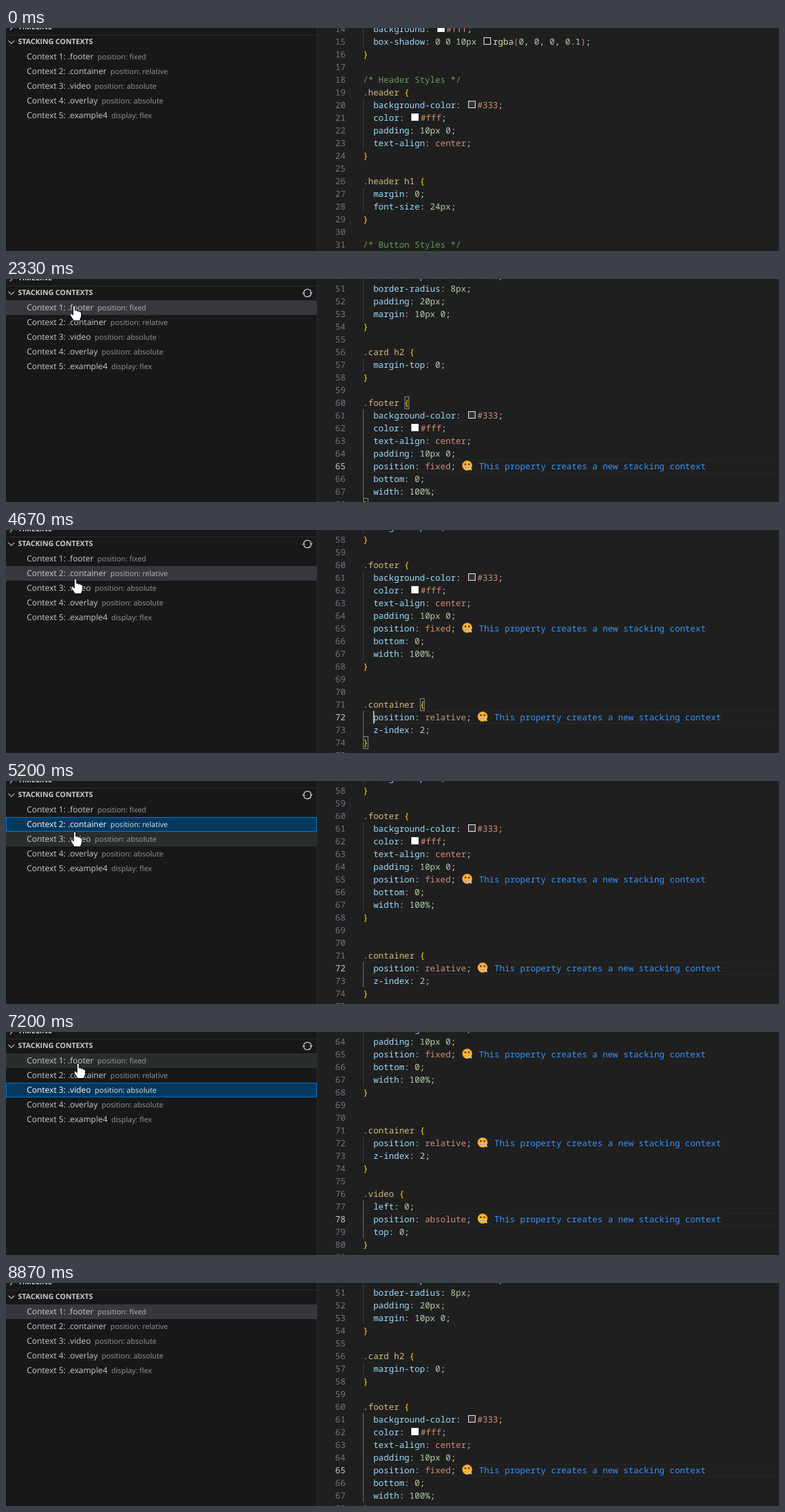
Recreate the animation shown at these times as an HTML page. Size 1154 by 334 pixels, loop 9 s.

```html
<!DOCTYPE html>
<html lang="en">
<head>
<meta charset="utf-8">
<title>Stacking contexts</title>
<style>
  html, body { margin: 0; width: 100%; height: 100%; overflow: hidden; background: #1f1f1f; }
  body { position: relative; color: #ccc; text-rendering: geometricPrecision; white-space: pre; }

  #sidebar { position: absolute; left: 0; top: 0; width: 464px; height: 100%; background: #181818;
    border-right: 1px solid #2b2b2b; overflow: hidden; font: 12.3px/22px "Open Sans", sans-serif; }
  .title { position: absolute; left: 18px; font-size: 10.83px; font-weight: bold; }
  .row { position: absolute; left: 0; width: 433px; height: 22px; padding-left: 31px; }
  .row small { margin-left: 5.8px; font-size: 11.1px; opacity: .7; }
  .row.hover { background: #2a2d2e; }
  .row.selected { background: #37373d; }
  .row.selected small { opacity: .85; }
  .row.focused { background: #04395e; color: #fff; box-shadow: inset 0 0 0 1px #0078d4; }
  #icons { position: absolute; left: 0; top: 0; fill: none; stroke: #ccc; stroke-width: 1.1; }
  #tooltip { position: absolute; left: 111px; top: 53px; height: 22px; padding: 0 8px; font-size: 11.8px;
    background: #202020; border: 1px solid #454545; border-radius: 3px; }

  #editor { position: absolute; left: 465px; right: 0; top: 0; height: 100%; overflow: hidden;
    font: 12.83px/19px "Noto Sans Mono", monospace; }
  .line { position: absolute; left: 68px; right: 0; height: 19px; }
  .number { position: absolute; right: calc(100% + 26px); color: #6e7681; }
  .indented::before { content: ""; position: absolute; left: 0; top: 0; width: 1px; height: 19px; background: #404040; }
  .inside::before { background: #707070; }
  .current { box-shadow: inset 0 1px #282828, inset 0 -1px #282828; }
  .current .number { color: #ccc; }
  .matched .brace { background: rgba(0, 100, 0, .1); box-shadow: inset 0 0 0 1px #888; }
  .brace { display: inline-block; height: 19px; color: #ffd700; }
  .paren { color: #da70d6; }
  .comment { color: #6a9955; }
  .selector { color: #d7ba7d; }
  .property { color: #9cdcfe; }
  .value { color: #ce9178; }
  .num { color: #b5cea8; }
  .func { color: #dcdcaa; }
  .note { color: #3794ff; }
  .note svg { display: inline-block; width: 19px; height: 17px; vertical-align: -3px; }
  .swatch { display: inline-block; box-sizing: border-box; width: 11.2px; height: 11.2px; margin: 0 2.8px;
    border: 1px solid #eee; }
  #caret { position: absolute; left: 82.5px; top: 271px; width: 2px; height: 19px; background: #aeafad; }

  #pointer { position: absolute; left: 0; top: 0; overflow: visible; fill: #fff; stroke: #000; }
</style>
</head>
<body>
<div id="editor"><div id="code"></div><div id="caret"></div></div>
<div id="sidebar">
  <div class="title" style="top:-12px">TIMELINE</div>
  <div class="title" style="top:10px">STACKING CONTEXTS</div>
  <svg id="icons" width="464" height="34">
    <path d="M0 10.5H464" stroke="#2b2b2b"/>
    <path d="M6 -5L10 -1L6 3.3M3.5 18.8L8 23.3L12.5 18.8"/>
    <g id="refresh" stroke-width="1.4">
      <path d="M444.5 20A5.7 5.7 0 0 1 455.4 19M455.5 22A5.7 5.7 0 0 1 444.6 23"/>
      <path d="M453 19.8H458L455.6 22.6ZM442 22.2H447L444.4 19.4Z" fill="#ccc" stroke="none"/>
    </g>
  </svg>
</div>
<svg id="pointer" width="1" height="1">
  <path id="hand" d="M-2 1.6Q-2 0 -.4 0Q1.2 0 1.2 1.6V7Q3.6 6 4.6 8Q7 7 7.8 9Q10.5 8.5 10.5 11.2V16L8.2 22.5H-1L-6 14.8Q-7 11.5 -4.4 11.6L-2 14Z"/>
  <path id="arrow" d="M0 0V16L3.8 12.6L6.2 18.4L8.8 17.3L6.4 11.7H11.4Z"/>
</svg>
<script>
const LOOP = 9000, ROW_TOP = 32, ROW_HEIGHT = 22, LINE = 19, CURRENT_TOP = 271;
const $ = id => document.getElementById(id);

const contexts = [
  ['.footer', 'position: fixed'], ['.container', 'position: relative'], ['.video', 'position: absolute'],
  ['.overlay', 'position: absolute'], ['.example4', 'display: flex'],
];

// Only the parts of the style sheet that scroll into view, keyed by first line number.
const listing = {
  14: `  background: #fff;
  box-shadow: 0 0 10px rgba(0, 0, 0, 0.1);
}

/* Header Styles */
.header {
  background-color: #333;
  color: #fff;
  padding: 10px 0;
  text-align: center;
}

.header h1 {
  margin: 0;
  font-size: 24px;
}

/* Button Styles */`,
  50: `  border: 1px solid #ddd;
  border-radius: 8px;
  padding: 20px;
  margin: 10px 0;
}

.card h2 {
  margin-top: 0;
}

.footer {
  background-color: #333;
  color: #fff;
  text-align: center;
  padding: 10px 0;
  position: fixed;
  bottom: 0;
  width: 100%;
}


.container {
  position: relative;
  z-index: 2;
}

.video {
  left: 0;
  position: absolute;
  top: 0;
}
`,
};
const blocks = { 65: [60, 68], 72: [71, 74], 78: [76, 80] };

// [time, selected row, where the focus is, current line]
const START_LINE = 28 + 13 / LINE;
const states = [
  [0, -1, 'none', START_LINE], [1800, 0, 'list', START_LINE], [1870, 0, 'editor', 65],
  [3530, 0, 'list', 65], [3670, 1, 'list', 65], [3730, 1, 'editor', 72],
  [5130, 1, 'list', 72], [5400, 2, 'list', 72], [5470, 2, 'editor', 78],
  [7130, 2, 'list', 78], [7265, 0, 'list', 78], [7330, 0, 'editor', 65],
  [8800, 0, 'none', 65],
];

// [time, x, y] of the pointer's hot spot
const path = [
  [870, 150, 4], [1330, 102, 40], [2800, 102, 40], [3330, 103, 63], [4530, 103, 63], [4670, 104, 73],
  [4930, 103, 76], [6400, 103, 76], [6930, 108, 47], [8000, 108, 47], [8600, 130, 340],
];

const span = (cls, text) => `<span class="${cls}">${text}</span>`;
const swatch = color => `<span class="swatch" style="background:${color}"></span>`;
const note = ' ' + span('note', `<svg viewBox="0 0 19 17">
<circle cx="9.5" cy="8.5" r="7.4" fill="#ffb02e"/><circle cx="6.8" cy="6.5" r="1.3" fill="#402a32"/>
<circle cx="12.2" cy="6.5" r="1.3" fill="#402a32"/><path d="M5.5 11.5H13L16 15" fill="none" stroke="#d3d3d3" stroke-width="2.2"/>
<path d="M6 11.5H13" stroke="#636363" stroke-dasharray="1 1"/></svg> This property creates a new stacking context`);

function highlightValue(value) {
  return value.replace(/(#\w+)|(rgba)|([\d.]+[a-z%]*)|([a-z]+)|([()])/g, (m, hex, func, num, word, paren) =>
    hex ? swatch(hex) + span('value', hex) :
    func ? swatch('rgba(0,0,0,.1)') + span('func', func) :
    span(num ? 'num' : word ? 'value' : 'paren', m));
}

function highlight(text) {
  if (text.startsWith('/*')) return span('comment', text);
  if (text === '}') return span('brace', text);
  if (text.endsWith('{')) return span('selector', text.slice(0, -1)) + span('brace', '{');
  const [name, value] = text.split(':');
  if (!value) return text;
  return span('property', name) + ':' + highlightValue(value) + (name.trim() === 'position' ? note : '');
}

function add(parent, cls, html, top) {
  const el = document.createElement('div');
  el.className = cls;
  el.innerHTML = html;
  if (top !== undefined) el.style.top = top + 'px';
  return parent.appendChild(el);
}

const lines = Object.entries(listing).flatMap(([first, text]) => text.split('\n').map((content, i) => {
  const n = +first + i;
  const el = add($('code'), 'line' + (content.startsWith('  ') ? ' indented' : ''),
    span('number', n) + highlight(content), n * LINE);
  return { n, el };
}));
const rows = contexts.map(([name, rule], i) =>
  add($('sidebar'), 'row', `Context ${i + 1}: ${name}<small>${rule}</small>`, ROW_TOP + i * ROW_HEIGHT));
const tooltip = add($('sidebar'), '', 'Context 1: .footer position: fixed');
tooltip.id = 'tooltip';

function pointerAt(t) {
  if (t < path[0][0] || t >= path[path.length - 1][0]) return null;
  const i = path.findIndex(p => p[0] > t);
  const [t0, x0, y0] = path[i - 1], [t1, x1, y1] = path[i];
  const p = (t - t0) / (t1 - t0), e = p * p * (3 - 2 * p);
  return { x: x0 + (x1 - x0) * e, y: y0 + (y1 - y0) * e };
}

const show = (el, visible) => { el.style.visibility = visible ? 'visible' : 'hidden'; };

function render(t) {
  const [since, selected, focus, current] = states.filter(s => s[0] <= t).pop();
  const inEditor = focus === 'editor';
  const block = blocks[current] || [0, 0];
  const pointer = pointerAt(t);
  const hovered = pointer ? Math.floor((pointer.y - ROW_TOP) / ROW_HEIGHT) : -1;

  rows.forEach((el, i) => {
    el.classList.toggle('hover', i === hovered);
    el.classList.toggle('selected', i === selected);
    el.classList.toggle('focused', i === selected && focus === 'list');
  });
  $('code').style.transform = `translateY(${Math.round(CURRENT_TOP - current * LINE)}px)`;
  for (const { n, el } of lines) {
    el.classList.toggle('current', n === current);
    el.classList.toggle('inside', n > block[0] && n < block[1]);
    el.classList.toggle('matched', inEditor && block.includes(n));
  }
  show($('caret'), inEditor && (t - since + 35) % 970 < 485);

  show(tooltip, t >= 1530 && t < 1670);
  tooltip.style.opacity = t < 1595 ? .25 : 1;
  show($('refresh'), pointer);
  show($('pointer'), pointer);
  if (pointer) {
    const overList = pointer.y < ROW_TOP + rows.length * ROW_HEIGHT;
    $('pointer').style.transform = `translate(${Math.round(pointer.x)}px, ${Math.round(pointer.y)}px)`;
    $('hand').style.display = overList ? '' : 'none';
    $('arrow').style.display = overList ? 'none' : '';
  }
}

const begin = performance.now();
function tick() {
  render((performance.now() - begin) % LOOP);
  requestAnimationFrame(tick);
}
tick();
</script>
</body>
</html>
```
